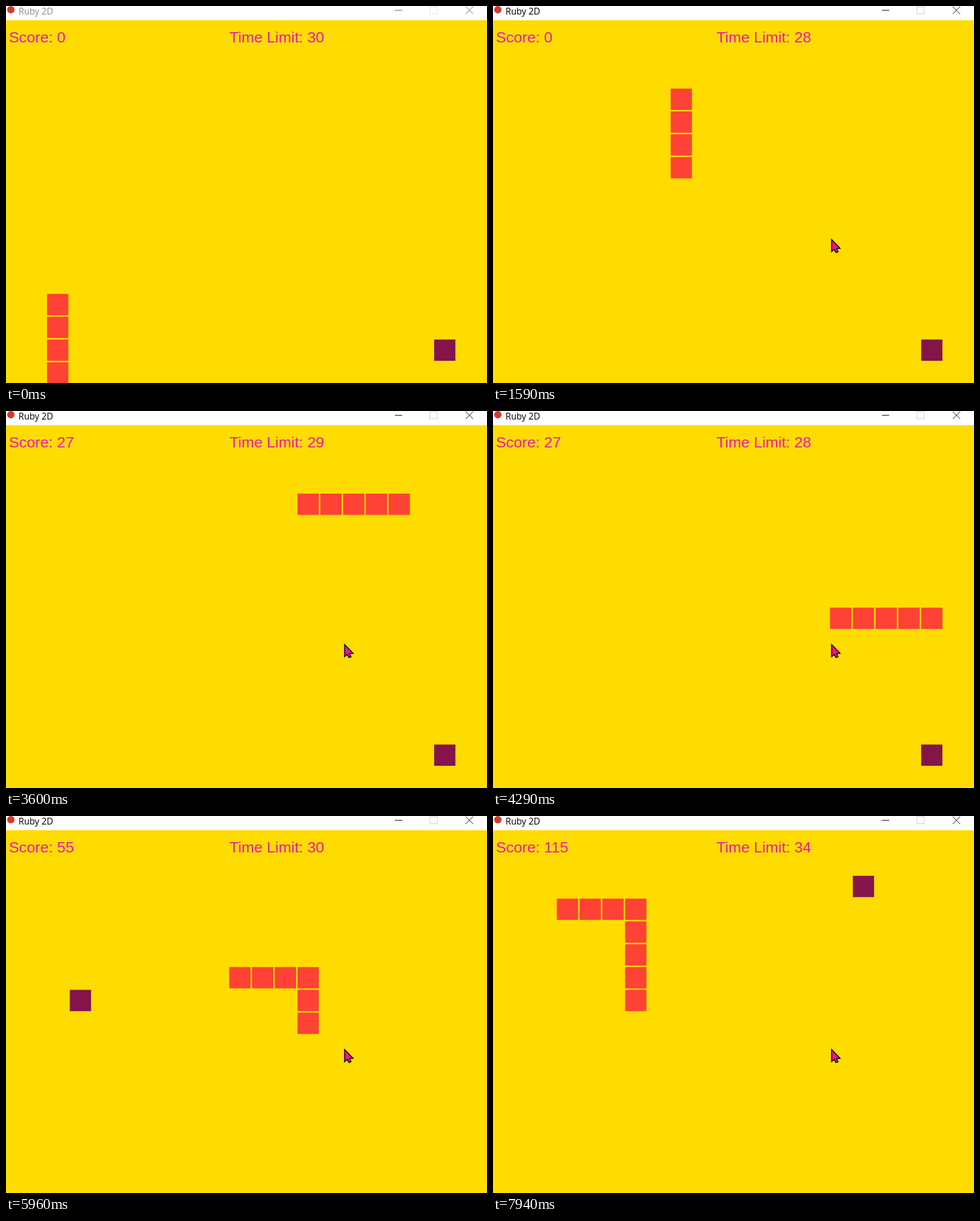
Animation of 846x662 px, one loop 7990 ms. Source, as an HTML page with a canvas:

```html
<!DOCTYPE html>
<html lang="en">
<head>
<meta charset="utf-8">
<title>Ruby 2D</title>
<style>
html, body { margin: 0; width: 100%; height: 100%; overflow: hidden; background: #ffdc00; }
canvas { display: block; }
</style>
</head>
<body>
<canvas id="stage" width="846" height="662"></canvas>
<script>
const ctx = document.getElementById('stage').getContext('2d');
const LOOP = 7990;
const ROWS = 16, PITCH = 40.05, SIZE = 37.4, LEFT = -7.9, TOP = 24.95;
const STEP_MS = 66.1, STEP_LEAD = 6;
const FOCUS_AT = 420, FIRST_TICK = 120;
const START_LENGTH = 4, START_LIMIT = 30, BONUS = 3;

const DIRS = { U: [0, -1], D: [0, 1], L: [-1, 0], R: [1, 0] };
// The first cells walked are the body the snake starts with.
const MOVES = 'U15 R6 D13 R11 D6 L6 D5 R6 D7 L6 U9 L10 D7 R3 U10 L3';
const FOOD = [[19, 14], [19, 14], [3, 7], [4, 3], [16, 2]];

const trail = buildTrail(2, 15);
const meals = findMeals();

function buildTrail(x, y) {
  const cells = [[x, y]];
  for (const move of MOVES.split(' ')) {
    const [dx, dy] = DIRS[move[0]];
    for (let n = +move.slice(1); n > 0; n--) {
      x += dx;
      y = (y + dy + ROWS) % ROWS;
      cells.push([x, y]);
    }
  }
  return cells;
}

// Each meal adds the time left to the score, then extends the limit.
function findMeals() {
  const found = [];
  let score = 0;
  for (let step = 0; step + START_LENGTH <= trail.length; step++) {
    const [x, y] = trail[step + START_LENGTH - 1];
    const [foodX, foodY] = FOOD[found.length];
    if (x !== foodX || y !== foodY) continue;
    score += limitAt(step * STEP_MS, found.length);
    found.push({ step, score });
  }
  return found;
}

function limitAt(t, eaten) {
  const ticks = Math.max(0, Math.floor((t - FIRST_TICK) / 1000) + 1);
  return START_LIMIT - ticks + BONUS * eaten;
}

function cell([col, row], color) {
  ctx.fillStyle = color;
  ctx.fillRect(LEFT + col * PITCH, TOP + row * PITCH, SIZE, SIZE);
}

function text(str, x, y, font, color) {
  ctx.font = font;
  ctx.fillStyle = color;
  ctx.fillText(str, x, y);
}

function line(x1, y1, x2, y2) {
  ctx.beginPath();
  ctx.moveTo(x1, y1);
  ctx.lineTo(x2, y2);
  ctx.stroke();
}

function drawTitleBar(active) {
  ctx.fillStyle = '#fff';
  ctx.fillRect(0, 0, 846, 25);
  ctx.fillStyle = '#d8382e';
  ctx.beginPath();
  ctx.arc(8.5, 6.5, 6.5, 0, Math.PI * 2);
  ctx.fill();
  text('Ruby 2D', 22, 14.5, '15.7px "Open Sans", sans-serif', active ? '#000' : '#8c8c8c');

  ctx.lineWidth = 1;
  ctx.strokeStyle = active ? '#000' : '#666';
  line(684, 7.5, 697, 7.5);
  line(808.5, 1, 821.5, 14);
  line(821.5, 1, 808.5, 14);
  ctx.strokeStyle = active ? '#ccc' : '#e4e4e4';
  ctx.strokeRect(745.5, 1.5, 13, 12);
}

function drawCursor(t) {
  const p = Math.min(1, (t - 120) / 400);
  if (p < 0) return;
  const rest = (1 - p) ** 2;
  ctx.save();
  ctx.translate(595.5 + 110 * rest, 410 + 255 * rest);
  const arrow = new Path2D('M0 0V21.5L4.7 17.5L7.7 23L11.5 21.5L8.8 16L15 15.5Z');
  ctx.fillStyle = '#f0109c';
  ctx.fill(arrow);
  ctx.lineWidth = 1.6;
  ctx.strokeStyle = '#000';
  ctx.stroke(arrow);
  ctx.restore();
}

function draw(t) {
  const step = Math.floor((t + STEP_LEAD) / STEP_MS);
  const past = meals.filter(meal => meal.step < step);
  const eaten = past.length;
  const score = eaten ? past[eaten - 1].score : 0;

  ctx.fillStyle = '#ffdc00';
  ctx.fillRect(0, 0, 846, 662);

  const end = step + START_LENGTH;
  trail.slice(step - eaten, end).forEach(c => cell(c, '#ff4136'));
  cell(FOOD[eaten], '#85144b');

  const font = '26.7px "Liberation Sans", Arial, sans-serif';
  text('Score: ' + score, 5.3, 63.5, font, '#f213b0');
  text('Time Limit: ' + limitAt(t, eaten), 393, 63.5, font, '#f213b0');

  drawTitleBar(t >= FOCUS_AT);
  drawCursor(t);
}

const began = performance.now();
function frame() {
  draw((performance.now() - began) % LOOP);
  requestAnimationFrame(frame);
}
frame();
</script>
</body>
</html>
```
